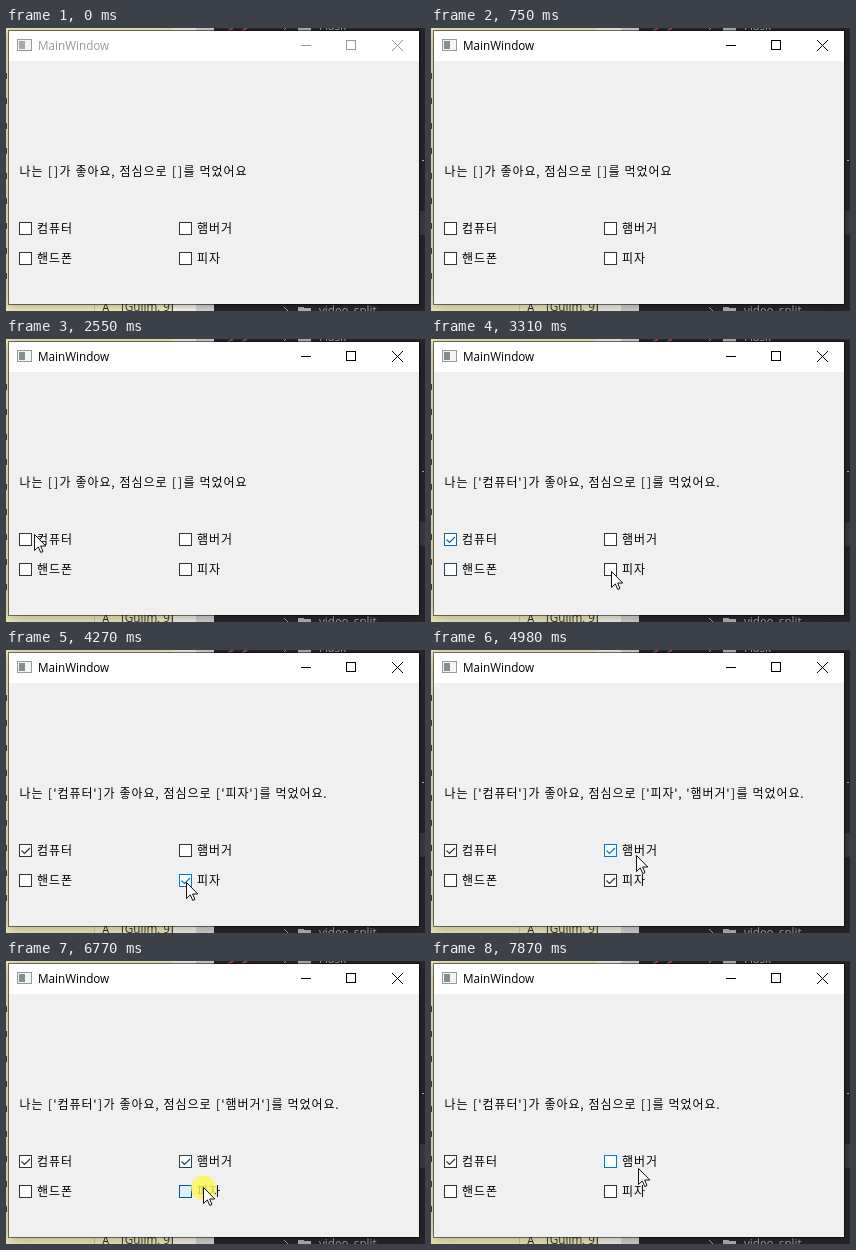
Write an HTML page with a canvas that moves like this. It is 419 px wide and 283 px high and loops after 8000 ms.

```html
<!DOCTYPE html>
<html lang="ko">
<head>
<meta charset="utf-8">
<title>MainWindow</title>
<style>
html, body { margin: 0; width: 100%; height: 100%; overflow: hidden; }
canvas { display: block; }
</style>
</head>
<body>
<canvas id="stage" width="419" height="283"></canvas>
<script>
const ctx = document.getElementById('stage').getContext('2d');
const HANGUL = '12px "Noto Sans CJK KR", "Noto Sans CJK", sans-serif';
const LATIN = '11.7px "Open Sans", "Noto Sans", sans-serif';
const LOOP = 8000, ACTIVATE = 350, ENTER = 1020, CIRCLE = 1840, SETTLE = 2620;
const GLIDE = 160, HOLD = 120, FADE = 120;

const boxes = ['컴퓨터', '햄버거', '핸드폰', '피자'].map((label, i) => ({
  label, group: i % 2, x: 13 + 160 * (i % 2), y: 194 + 30 * (i >> 1),
}));

const over = (box, [x, y]) =>
  x >= box.x && x < box.x + 151 && y >= box.y - 4 && y < box.y + 18;

// arrival and press times, then the pointer tip
const clicks = [
  [SETTLE, 2750, 35, 201], [3310, 3450, 180, 232], [4480, 4560, 205, 205],
  [5310, 5510, 204, 205], [5790, 5805, 190, 227], [6210, 6410, 200, 206],
  [6690, 6720, 197, 226], [7040, 7310, 197, 226], [7600, 7620, 207, 207],
].map(([arrive, press, ...tip]) => ({
  arrive, press, release: press + HOLD, tip, box: boxes.find(b => over(b, tip)),
}));

const clamp = v => Math.max(0, Math.min(1, v));
const ramp = (t, from, to) => clamp((t - from) / (to - from));
const ease = k => k * k * (3 - 2 * k);
const mix = (a, b, k) => a.map((v, i) => v + (b[i] - v) * k);
const rgb = c => `rgb(${c.map(Math.round)})`;

// Enters from the left, circles the options, then glides from click to click
function pointer(t) {
  if (t < CIRCLE) return mix([-14, 79], [104, 222], ramp(t, ENTER, CIRCLE));
  if (t < SETTLE) {
    const a = 1.72 * Math.PI * ease(ramp(t, CIRCLE, SETTLE));
    return [104 + 90 * Math.sin(a), 164 + 58 * Math.cos(a)];
  }
  return clicks.reduce((at, { arrive, tip }) =>
    mix(at, tip, ease(ramp(t, arrive - GLIDE, arrive))), clicks[0].tip);
}

function rect(x, y, w, h, color) {
  ctx.fillStyle = color;
  ctx.fillRect(x, y, w, h);
}

function frame(x, y, w, h, color) {
  ctx.strokeStyle = color;
  ctx.lineWidth = 1;
  ctx.strokeRect(x + 0.5, y + 0.5, w - 1, h - 1);
}

function line(points, color, width = 1) {
  ctx.beginPath();
  points.forEach(([x, y]) => ctx.lineTo(x, y));
  ctx.strokeStyle = color;
  ctx.lineWidth = width;
  ctx.stroke();
}

function latin(text, x, y, color) {
  ctx.font = LATIN;
  ctx.textAlign = 'left';
  ctx.fillStyle = color;
  ctx.fillText(text, x, y);
}

// Fixed-pitch Korean UI type
function hangul(text, x, y) {
  ctx.font = HANGUL;
  ctx.textAlign = 'center';
  ctx.fillStyle = '#000';
  for (const c of text) {
    const advance = c >= '가' ? 12 : '[]'.includes(c) ? 6 : 4;
    ctx.fillText(c, x + advance / 2, y);
    x += advance;
  }
}

function treeRow(label, y) {
  line([[278, y - 4], [282, y], [278, y + 4]], '#aaa');
  rect(292, y - 4, 6, 2, '#b5b5b5');
  rect(292, y - 3, 13, 9, '#b5b5b5');
  latin(label, 313, y + 4, '#aaa');
}

function drawDesktop() {
  rect(0, 0, 419, 283, '#28262b');
  rect(0, 0, 208, 283, '#f0ebbb');
  rect(166, 0, 24, 283, '#f5f3e6');
  rect(190, 0, 18, 283, '#d5d4d2');
  for (const x of [88, 165]) rect(x, 277, 1, 6, '#cfcb9f');
  for (let y = 45; y < 260; y += 25) rect(0, y, 1, 6, '#444');
  rect(414, 183, 5, 24, '#3d3b40');
  rect(416, 132, 2, 1, '#bbb');
  latin('A', 96, 284, '#222');
  latin('[Gulim, 9]', 115, 283, '#333');
  treeRow('Flask', -2);
  treeRow('video_split', 283);
  for (const x of [222, 236]) line([[x, 3], [x + 5, 0]], '#a34a5c', 2);
}

function drawWindow(active) {
  const ink = active ? '#000' : '#999';
  ctx.shadowColor = 'rgba(0,0,0,.6)';
  ctx.shadowBlur = active ? 14 : 8;
  ctx.shadowOffsetY = active ? 2 : 1;
  rect(2, 2, 412, 275, 'rgba(0,0,0,.5)');
  ctx.shadowColor = 'transparent';
  rect(3, 3, 410, 30, '#fff');
  rect(3, 33, 410, 243, '#f0f0f0');
  rect(12, 12, 14, 11, '#f4f4f4');
  frame(11, 11, 15, 12, '#999');
  rect(13, 13, 6, 8, active ? '#7f8f92' : '#a3adb0');
  latin('MainWindow', 32, 22, ink);
  rect(295, 17, 10, 1, ink);
  frame(340, 12, 10, 10, ink);
  line([[386, 12], [397, 23]], ink);
  line([[397, 12], [386, 23]], ink);
}

function drawBox(box, t, checked) {
  const last = clicks.filter(c => c.box === box && c.press <= t).pop();
  const settled = last ? ramp(t, last.release, last.release + FADE) : 1;
  const press = last ? ramp(t, last.press, last.press + 80) * (1 - settled) : 0;
  const hover = [60, 120, 180, 240].filter(d => over(box, pointer(t - d))).length / 4;
  const edge = rgb(mix(mix([51, 51, 51], [0, 120, 215], hover), [0, 84, 153], press));
  const shown = last && t < last.release ? +checked : checked ? settled : 1 - settled;
  const { x, y } = box;

  rect(x, y, 13, 13, rgb(mix([255, 255, 255], [204, 228, 247], press)));
  frame(x, y, 13, 13, edge);
  ctx.globalAlpha = shown;
  line([[x + 2.5, y + 6.5], [x + 5.5, y + 9.5], [x + 11, y + 4]], edge, 1.2);
  ctx.globalAlpha = 1;
  hangul(box.label, x + 17.5, y + 11);
}

function drawPointer(t) {
  const [x, y] = pointer(t);
  ctx.save();
  ctx.translate(Math.round(x), Math.round(y));
  if (clicks.some(c => t >= c.press && t < c.release)) {
    ctx.fillStyle = 'rgba(254,246,80,.8)';
    ctx.beginPath();
    ctx.arc(0.5, 1, 12.5, 0, 7);
    ctx.fill();
  }
  const arrow = new Path2D('M.5 .5V16.5L4.3 12.9 6.8 18.5 9 17.5 6.6 12H11.8Z');
  ctx.fillStyle = '#fff';
  ctx.fill(arrow);
  ctx.strokeStyle = '#111';
  ctx.lineWidth = 1;
  ctx.stroke(arrow);
  ctx.restore();
}

function draw(t) {
  let chosen = [];
  for (const { release, box } of clicks) {
    if (release > t) break;
    chosen = chosen.includes(box) ? chosen.filter(b => b !== box) : [...chosen, box];
  }
  const list = group => '[' + chosen.filter(b => b.group === group)
    .map(b => `'${b.label}'`).join(', ') + ']';
  const end = chosen.length ? '.' : '';

  drawDesktop();
  drawWindow(t >= ACTIVATE);
  hangul(`나는 ${list(0)}가 좋아요, 점심으로 ${list(1)}를 먹었어요${end}`, 13, 148);
  boxes.forEach(box => drawBox(box, t, chosen.includes(box)));
  drawPointer(t);
}

const start = performance.now();
function tick() {
  draw((performance.now() - start) % LOOP);
  requestAnimationFrame(tick);
}
tick();
</script>
</body>
</html>
```
